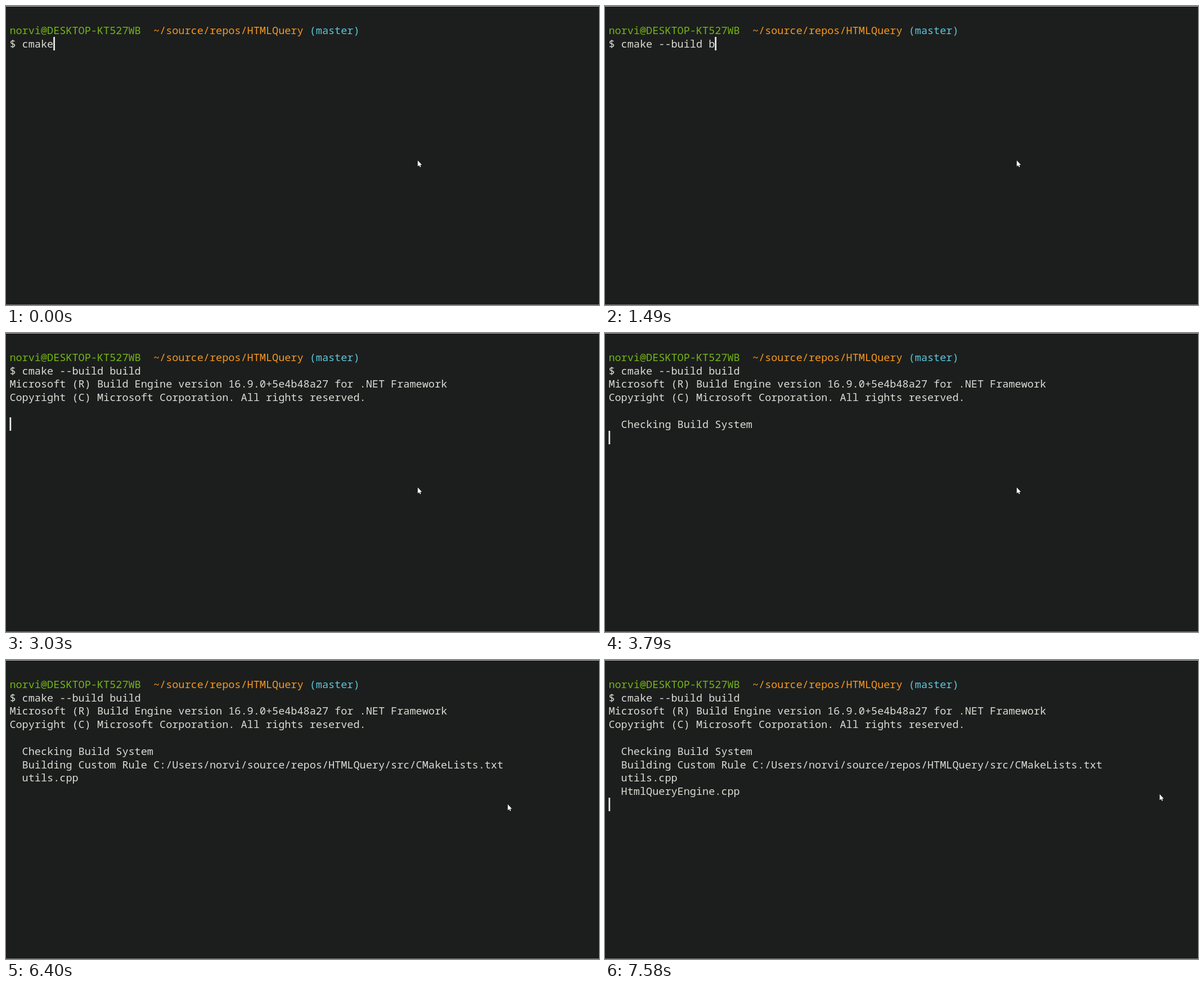
Animation of 1054x532 px, one loop 8000 ms. Source, as an HTML page with a canvas:

```html
<!DOCTYPE html>
<html lang="en">
<head>
<meta charset="utf-8">
<title>Terminal build</title>
<style>
html, body { margin: 0; width: 100%; height: 100%; overflow: hidden; background: #1c1e1d; }
canvas { display: block; }
</style>
</head>
<body>
<canvas id="stage" width="1054" height="532"></canvas>
<script>
const ctx = document.getElementById('stage').getContext('2d');
const LOOP = 8000, BLINK = 530;
const LEFT = 6.4, TOP = 31.4, CELL = 11.11, LINE = 23.8, BASELINE = 18.4;

// Typing bursts: first key, last key, text
const bursts = [
  [260, 460, ' --'],
  [630, 980, 'build'],
  [1260, 1490, ' b'],
  [1860, 2080, 'uild']
];
const enterTime = 2670;
const keys = bursts.flatMap(([first, last, text]) => [...text].map((char, i) =>
  ({ char, time: first + (last - first) * i / (text.length - 1) })));

const output = [
  { time: 3030, text: 'Microsoft (R) Build Engine version 16.9.0+5e4b48a27 for .NET Framework' },
  { time: 3030, text: 'Copyright (C) Microsoft Corporation. All rights reserved.' },
  { time: 3030, text: '' },
  { time: 3790, text: '  Checking Build System' },
  { time: 4220, text: '  Building Custom Rule C:/Users/norvi/source/repos/HTMLQuery/src/CMakeLists.txt' },
  { time: 4520, text: '  utils.cpp' },
  { time: 6520, text: '  HtmlQueryEngine.cpp' }
];

// Pointer glides: start, duration, dx, dy
const glides = [
  [6130, 620, 249, -28],
  [7050, 90, 1, -5],
  [7520, 60, 4, -3]
];
const pointerShape = new Path2D('M.8 .8V11.6L3.3 9.3 4.9 12.8 6.6 12.1 5 8.7H8.3Z');

const easeOut = p => 1 - (1 - p) ** 1.8;
const clamp01 = p => Math.min(1, Math.max(0, p));

function bar(color, x, y, width, height) {
  ctx.fillStyle = color;
  ctx.fillRect(x, y, width, height);
}

// Each character sits in its own terminal cell.
function print(text, row, col = 0, color = '#dcdcd6') {
  ctx.fillStyle = color;
  [...text].forEach((char, i) =>
    ctx.fillText(char, LEFT + (col + i) * CELL, Math.round(TOP + row * LINE + BASELINE)));
}

// The blink restarts whenever the caret moves.
function drawCaret(t, row, col, lastMove) {
  if (Math.floor((t - lastMove) / BLINK) % 2 === 0)
    bar('#e8e8e4', LEFT + col * CELL, Math.floor(TOP + row * LINE), 2.8, 24);
}

function drawPointer(t) {
  let x = 731, y = 274;
  for (const [start, duration, dx, dy] of glides) {
    const p = easeOut(clamp01((t - start) / duration));
    x += dx * p;
    y += dy * p;
  }
  ctx.save();
  ctx.translate(Math.round(x), Math.round(y));
  ctx.strokeStyle = '#000';
  ctx.stroke(pointerShape);
  ctx.fillStyle = '#fff';
  ctx.fill(pointerShape);
  ctx.restore();
}

function draw(t) {
  bar('#1c1e1d', 0, 0, 1054, 532);
  bar('#b8b8b8', 0, 0, 1054, 1);
  bar('#777', 0, 531, 1054, 1);

  ctx.font = '18.52px "Noto Sans Mono", monospace';
  print('norvi@DESKTOP-KT527WB', 0, 0, '#74b616');
  print('~/source/repos/HTMLQuery', 0, 23, '#f7981f');
  print('(master)', 0, 48, '#5cc9de');

  const typed = keys.filter(key => key.time <= t);
  const command = '$ cmake' + typed.map(key => key.char).join('');
  print(command, 1);

  const lines = output.filter(line => line.time <= t);
  lines.forEach((line, i) => print(line.text, 2 + i));

  if (t < enterTime) drawCaret(t, 1, command.length, typed.at(-1)?.time ?? 70 - BLINK);
  else drawCaret(t, 2 + lines.length, 0, lines.at(-1)?.time ?? enterTime);

  drawPointer(t);
}

function tick() {
  draw(performance.now() % LOOP);
  requestAnimationFrame(tick);
}
tick();
</script>
</body>
</html>
```
